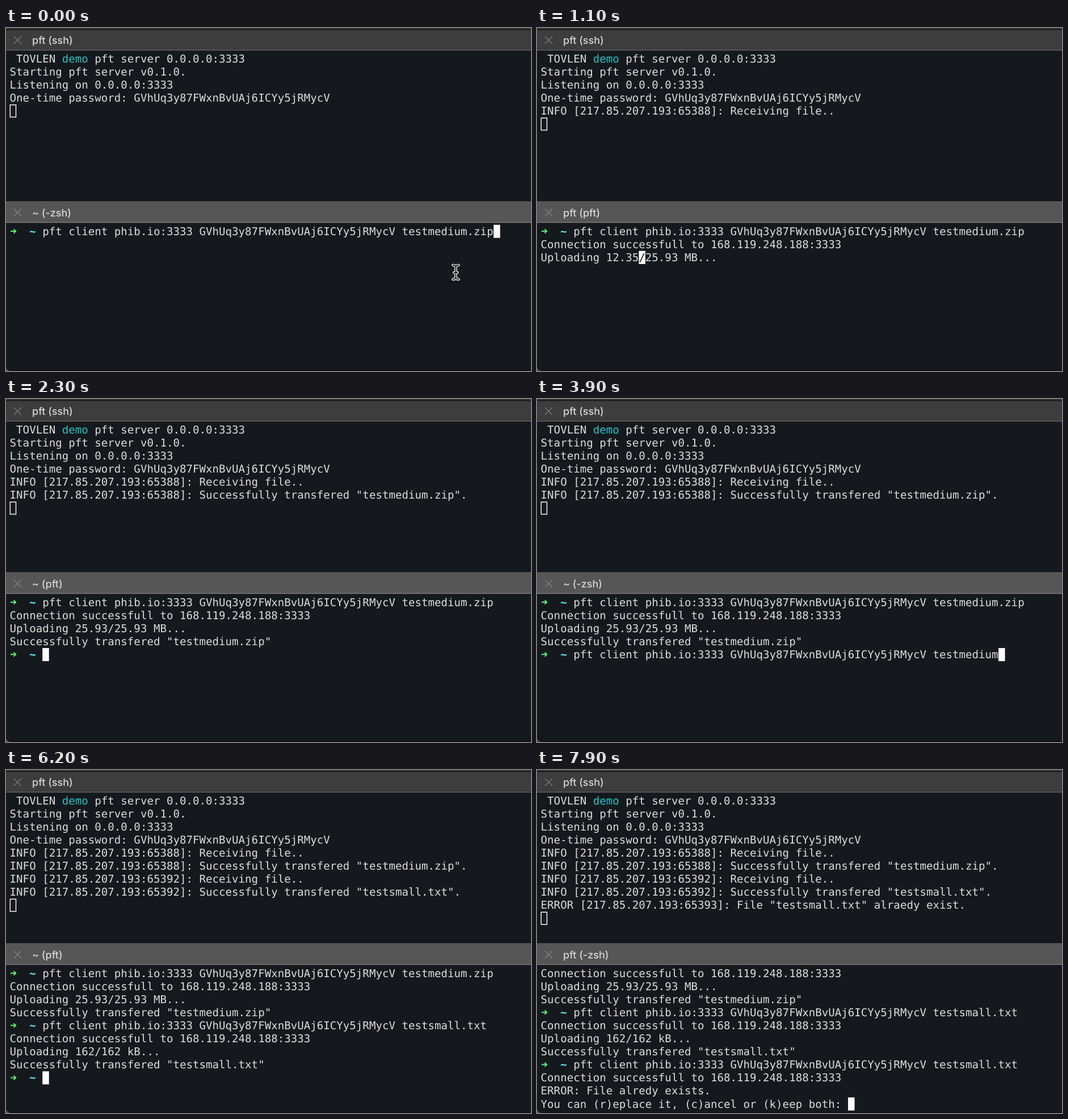
An HTML page for the animation above (8000 ms loop, 925 by 606 pixels).

```html
<!DOCTYPE html>
<html lang="en">
<head>
<meta charset="utf-8">
<title>File transfer in two terminals</title>
<style>
html, body { margin: 0; width: 100%; height: 100%; overflow: hidden; background: #15191d; }
svg { display: block; width: 925px; height: 606px; }
text { white-space: pre; text-rendering: geometricPrecision; }
.mono { font: 19.134px "DejaVu Sans Mono", monospace; fill: #dcdcdc; }
.title { font: 500 18px Inter, sans-serif; fill: #d6d6d6; }
</style>
</head>
<body>
<svg id="stage" viewBox="0 0 925 606" xmlns="http://www.w3.org/2000/svg">
  <rect width="925" height="606" fill="#15191d"/>
  <rect width="925" height="2" fill="#343434"/>
  <rect y="2" width="925" height="1.5" fill="#161616"/>
  <rect y="3.5" width="925" height="35" fill="#3d3d3d"/>
  <rect y="38.5" width="925" height="1.2" fill="#747474"/>
  <rect y="306" width="925" height="37.5" fill="#565656"/>
  <rect y="343" width="925" height="1.2" fill="#858585"/>
  <path d="M14 15l13 13m0-13l-13 13" stroke="#727272" stroke-width="1.6"/>
  <path d="M14 319.5l13 13m0-13l-13 13" stroke="#7d7d7d" stroke-width="1.6"/>
  <path d="M0 597Q1 605 9 606H0Z" fill="#50524f"/>
  <path d="M0 596Q1 605 9 605.5H925" fill="none" stroke="#08090b"/>
</svg>
<script>
const LOOP = 8000, CELL = 11.52, LINE = 23.08, LEFT = 6.6;
const TOP_PANE = 42.7, BOTTOM_PANE = 347.7, ROWS = 11;
const stage = document.getElementById("stage");

function add(tag, attrs, parent = stage) {
  const node = document.createElementNS("http://www.w3.org/2000/svg", tag);
  for (const key in attrs) node.setAttribute(key, attrs[key]);
  return parent.appendChild(node);
}
const set = (node, attrs) => { for (const key in attrs) node.setAttribute(key, attrs[key]); };
const colX = col => LEFT + col * CELL;
const baseline = (pane, row) => pane + row * LINE + 18;
const show = (node, on) => node.setAttribute("visibility", on ? "visible" : "hidden");

function makeRow(pane, row) {
  const y = baseline(pane, row);
  const text = add("text", { class: "mono", x: LEFT, y });
  const prompt = add("g", {});
  add("path", {
    d: `M8 ${y - 6.7}h9.2m-3.7 -3.6l3.8 3.6l-3.8 3.6`,
    fill: "none", stroke: "#5ff27a", "stroke-width": 1.9
  }, prompt);
  add("text", { class: "mono", x: colX(3), y, style: "fill:#5ef5f7;font-weight:bold" }, prompt).textContent = "~";
  return { text, prompt };
}

add("text", { class: "title", x: 46, y: 28 }).textContent = "pft (ssh)";
const title = add("text", { class: "title", x: 46, y: 332.5 });
const block = add("rect", { width: CELL, height: 23.1, fill: "#fff" });
const topRows = Array.from({ length: ROWS }, (_, i) => makeRow(TOP_PANE, i));
const bottomRows = Array.from({ length: ROWS }, (_, i) => makeRow(BOTTOM_PANE, i));
const covered = add("text", { class: "mono", style: "fill:#15191d" });
const hollow = add("rect", {
  x: 7.3, width: 10.2, height: 21.6, fill: "none", stroke: "#f4f4f4", "stroke-width": 1.5
});
add("text", { class: "mono", x: colX(8), y: baseline(TOP_PANE, 0), style: "fill:#25c4c5" }).textContent = "demo";

// I-beam mouse pointer: white outline around a dark core
const pointer = add("g", { fill: "none", "stroke-linecap": "round" });
const beam = "M787.5 419Q792.5 419 792.5 423Q792.5 419 797.5 419M792.5 423V440M787.5 444Q792.5 444 792.5 440Q792.5 444 797.5 444M789.5 432H795.5";
add("path", { d: beam, stroke: "#f2f2f2", "stroke-width": 4.6 }, pointer);
add("path", { d: beam, stroke: "#15191d", "stroke-width": 1.8 }, pointer);

const PASSWORD = "GVhUq3y87FWxnBvUAj6ICYy5jRMycV";
const PROMPT = "$    ";
const COMMAND = `${PROMPT}pft client phib.io:3333 ${PASSWORD} `;
const CONNECTED = "Connection successfull to 168.119.248.188:3333";
const info = (port, message, level = "INFO") => `${level} [217.85.207.193:${port}]: ${message}`;

const SERVER_LOG = [
  [0, " TOVLEN      pft server 0.0.0.0:3333"],
  [0, "Starting pft server v0.1.0."],
  [0, "Listening on 0.0.0.0:3333"],
  [0, `One-time password: ${PASSWORD}`],
  [300, info(65388, "Receiving file..")],
  [2000, info(65388, 'Successfully transfered "testmedium.zip".')],
  [5900, info(65392, "Receiving file..")],
  [6000, info(65392, 'Successfully transfered "testsmall.txt".')],
  [7900, info(65393, 'File "testsmall.txt" alraedy exist.', "ERROR")]
];
const CLIENT_LOG = [
  [0, COMMAND + "testmedium.zip"],
  [300, CONNECTED],
  [400, upload],
  [2000, 'Successfully transfered "testmedium.zip"'],
  [2100, typed],
  [5900, CONNECTED],
  [5900, "Uploading 162/162 kB..."],
  [6000, 'Successfully transfered "testsmall.txt"'],
  [6100, t => t < 7300 ? PROMPT : COMMAND + "testsmall.txt"],
  [7900, CONNECTED],
  [7900, "ERROR: File alredy exists."],
  [7900, "You can (r)eplace it, (c)ancel or (k)eep both: "]
];
const TITLES = [
  [0, "~ (-zsh)"], [100, "pft (-zsh)"], [600, "pft (pft)"], [2100, "~ (pft)"],
  [2900, "~ (-zsh)"], [5800, "pft (-zsh)"], [6100, "~ (pft)"], [6700, "~ (-zsh)"], [7800, "pft (-zsh)"]
];
const ERASE_TIMES = [3600, 3700, 3800, 3900, 4100, 4200, 4400, 4500, 4700, 5000];

function uploaded(t) {
  const step = Math.floor(t / 100) * 100;
  return Math.min(25.93, 12.35 + (step - 1100) * 0.016975).toFixed(2);
}
function upload(t) { return `Uploading ${uploaded(t)}/25.93 MB...`; }

function typed(t) {
  if (t < 3200) return PROMPT;
  if (t >= 5800) return COMMAND + "testsmall.txt";
  if (t >= 5400) return COMMAND + "testsmall.txt ";
  if (t >= 5100) return COMMAND + "tests";
  const erased = ERASE_TIMES.filter(time => t >= time).length;
  return COMMAND + "testmedium.zip".slice(0, 14 - erased);
}

const linesAt = (log, t) => log.filter(([time]) => t >= time)
  .map(([, line]) => typeof line === "function" ? line(t) : line);

function cursorAt(t, lines) {
  const last = lines.length - 1, end = lines[last].length;
  const waiting = (t >= 100 && t < 400) || (t >= 2000 && t < 2100) ||
    (t >= 5800 && t < 6100) || (t >= 7800 && t < 7900);
  if (waiting) return [last + 1, 0];
  if (t >= 400 && t < 2000) {
    const slash = 10 + uploaded(t).length;
    return [last, Math.floor(t / 100) % 3 === 2 ? slash : end];
  }
  return [last, end];
}

function fill(rows, lines) {
  rows.forEach(({ text, prompt }, i) => {
    const line = lines[i] || "";
    const value = line.replace("$", " ");
    if (text.textContent !== value) text.textContent = value;
    show(prompt, line.startsWith("$"));
  });
}

function render(t) {
  const server = linesAt(SERVER_LOG, t);
  fill(topRows, server);
  set(hollow, { y: TOP_PANE + server.length * LINE + 0.8 });

  const client = linesAt(CLIENT_LOG, t);
  const [row, col] = cursorAt(t, client);
  const scroll = Math.max(0, client.length - ROWS);
  fill(bottomRows, client.slice(scroll));
  set(block, { x: colX(col), y: BOTTOM_PANE + (row - scroll) * LINE });
  set(covered, { x: colX(col), y: baseline(BOTTOM_PANE, row - scroll) });
  covered.textContent = (client[row] || "")[col] || "";

  title.textContent = TITLES.filter(([time]) => t >= time).pop()[1];
  show(pointer, t < 100);
}

const start = performance.now();
function tick(now) {
  render(Math.max(0, now - start) % LOOP);
  requestAnimationFrame(tick);
}
render(0);
requestAnimationFrame(tick);
</script>
</body>
</html>
```
